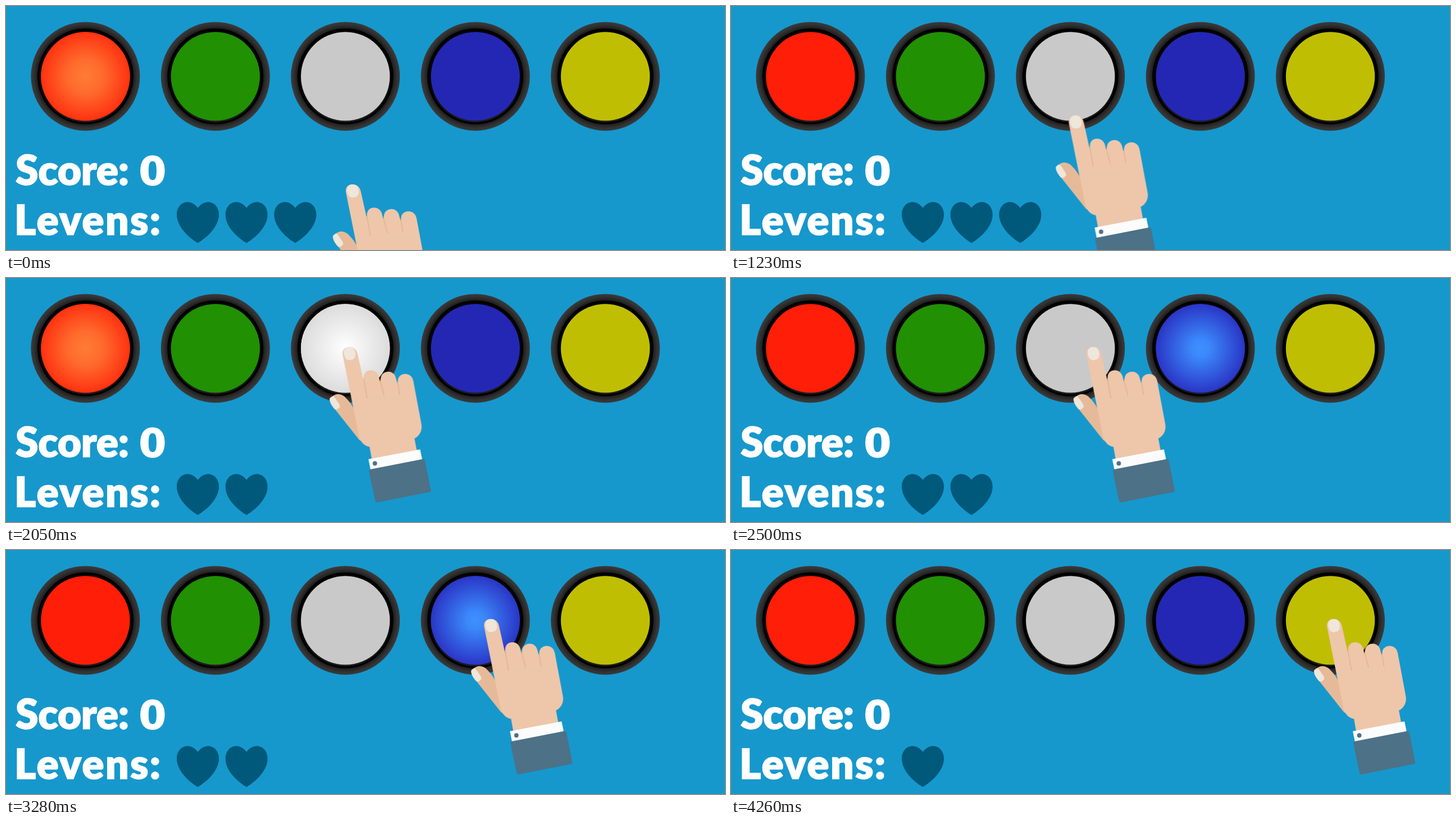
These frames come from a looping animation (1280 by 435 pixels, 4.59 s). An HTML page:

```html
<!DOCTYPE html>
<html lang="nl">
<head>
<meta charset="utf-8">
<title>Reactiespel</title>
<style>
  html, body { margin: 0; width: 100%; height: 100%; overflow: hidden; background: #1698cd; }
  svg { display: block; width: 100%; height: 100%; }
  text { font: 900 73px Lato, "Open Sans", sans-serif; fill: #fff; stroke: #fff; stroke-width: 1.5; }
  .digit { font: 700 70px "DejaVu Sans", sans-serif; }

  .lit, .heart { animation: 4590ms step-end infinite; }
  .red { animation-name: red; }
  .blue { animation-name: blue; }
  .white { animation-name: white; }
  .yellow { animation-name: yellow; }
  .life2 { animation-name: life2; }
  .life3 { animation-name: life3; }
  .hand { animation: hand 4590ms infinite; }

  @keyframes red {
    0%, 22.2222%, 44.6623% { visibility: visible; }
    3.9215%, 26.1437%, 49.0196%, 100% { visibility: hidden; }
  }
  @keyframes blue {
    0%, 55.7734%, 74.074%, 92.8104%, 100% { visibility: hidden; }
    51.8518%, 70.1525%, 88.4531% { visibility: visible; }
  }
  @keyframes white {
    0%, 47.4945%, 100% { visibility: hidden; }
    43.1372% { visibility: visible; }
  }
  @keyframes yellow {
    0%, 92.8104%, 100% { visibility: hidden; }
    88.4531% { visibility: visible; }
  }
  @keyframes life2 {
    0% { visibility: visible; }
    88.4531%, 100% { visibility: hidden; }
  }
  @keyframes life3 {
    0% { visibility: visible; }
    43.1372%, 100% { visibility: hidden; }
  }
  /* up to the white button, pause, then across to the yellow one */
  @keyframes hand {
    0% { transform: translate(5px, 168px); animation-timing-function: steps(65); }
    42.4836% { transform: translate(-0.8px, -27px); animation-timing-function: step-end; }
    51.8518% { transform: translate(-0.8px, -27px); animation-timing-function: steps(55); }
    87.7995%, 100% { transform: translate(461px, -27px); animation-timing-function: step-end; }
  }
</style>
</head>
<body>
<svg viewBox="0 0 1280 435" preserveAspectRatio="none">
  <defs>
    <radialGradient id="rim">
      <stop offset=".88" stop-color="#1d1d1d"/>
      <stop offset=".94" stop-color="#303030"/>
      <stop offset="1" stop-color="#3b3b3b"/>
    </radialGradient>
    <linearGradient id="well" x2="0" y2="1">
      <stop offset=".5" stop-color="#000"/>
      <stop offset="1" stop-color="#1c1c1c"/>
    </linearGradient>
    <radialGradient id="redGlow">
      <stop stop-color="#ff7c35"/>
      <stop offset=".4" stop-color="#ff6a2c"/>
      <stop offset="1" stop-color="#ff3211"/>
    </radialGradient>
    <radialGradient id="blueGlow">
      <stop stop-color="#3d90ff"/>
      <stop offset=".2" stop-color="#3b88fa"/>
      <stop offset="1" stop-color="#2a36c6"/>
    </radialGradient>
    <radialGradient id="whiteGlow">
      <stop stop-color="#fff"/>
      <stop offset="1" stop-color="#dcdcdc"/>
    </radialGradient>
    <radialGradient id="yellowGlow">
      <stop stop-color="#ffff4a"/>
      <stop offset="1" stop-color="#d6d410"/>
    </radialGradient>
    <g id="button">
      <circle r="97" fill="url(#rim)"/>
      <circle r="85.5" fill="#000"/>
      <circle r="82" fill="url(#well)"/>
      <circle r="79.2" fill="currentColor"/>
    </g>
    <path id="heart" fill="#00587b" d="M0 360c-5-7-12-10.500-18-10.500c-11.500 0-19.500 9.500-19.500 22.500c0 21 21 41 37.500 50.500c16.500-9.500 37.500-29.500 37.500-50.500c0-13-8-22.500-19.500-22.500c-6 0-13 3.500-18 10.500z"/>
  </defs>

  <rect width="1280" height="435" fill="#1698cd"/>

  <g transform="translate(141.4 125.4)">
    <use href="#button" color="#ff1e08"/>
    <use href="#button" x="231.4" color="#219003"/>
    <use href="#button" x="462.8" color="#c9c9c9"/>
    <use href="#button" x="694.2" color="#2427b3"/>
    <use href="#button" x="925.6" color="#c0be03"/>
    <circle class="lit red" r="79.2" fill="url(#redGlow)"/>
    <circle class="lit white" cx="462.8" r="79.2" fill="url(#whiteGlow)"/>
    <circle class="lit blue" cx="694.2" r="79.2" fill="url(#blueGlow)"/>
    <circle class="lit yellow" cx="925.6" r="79.2" fill="url(#yellowGlow)"/>
  </g>

  <text x="17" y="319" letter-spacing="-.3">Score:</text>
  <text class="digit" x="236.500" y="319">0</text>
  <text x="15" y="408" letter-spacing="2.3">Levens:</text>

  <use href="#heart" x="341.5"/>
  <use href="#heart" class="heart life2" x="428.2"/>
  <use href="#heart" class="heart life3" x="514.9"/>

  <g class="hand">
    <path fill="#e6ba98" d="M580 240C587 232 598 232 606 241C613 248 619 257 622 264L645 325L630 316L588 263Z"/>
    <path fill="#efe6dc" d="M577 245Q576 241 580 239Q583 236 586 240L594 252Q597 257 592 260Q589 263 586 261Q578 252 577 245Z"/>
    <path fill="#eec6aa" d="M600.500 166C598 154 605 150 612 150C620 150 625 155 626.500 162L636.500 207L638 212L637.500 204C638 196 643 191.500 650.500 191.500C658 191.500 663 197 664.500 203L666.500 212L668 205C669 198 674.500 194 681.500 194C689 194 694 200 695 206L697.500 215L698.500 209C699 202 705 198 711.500 198C719 198 724.500 203 726 211L740 286C743 298 737 309 728 313L733 340L653 356L648 328C640 327 634 321 630 313L625 288Z"/>
    <path fill="none" stroke="#e0b592" stroke-width="1.600" d="M637.500 206L643.500 242M667 210L674 237M698 213L701.500 235"/>
    <path fill="#efe6dc" d="M602 160C602 153 607 150 612 150C617.500 150 621.500 153 622.500 159C624 167 622 172 615.500 173C607 175 603 170 602 160Z"/>
    <path fill="#fcfcfc" d="M646 350L738 332.500L742 352L650 370Z"/>
    <circle cx="657.500" cy="357.500" r="3.900" fill="#4d7186"/>
    <path fill="#4d7186" d="M647 371Q647 368.500 650 368L742 350Q745.500 349 746.500 352L757 405Q757.500 408 755 408.500L662 427Q659 427.500 658 424L649 382Z"/>
  </g>
</svg>
</body>
</html>
```
